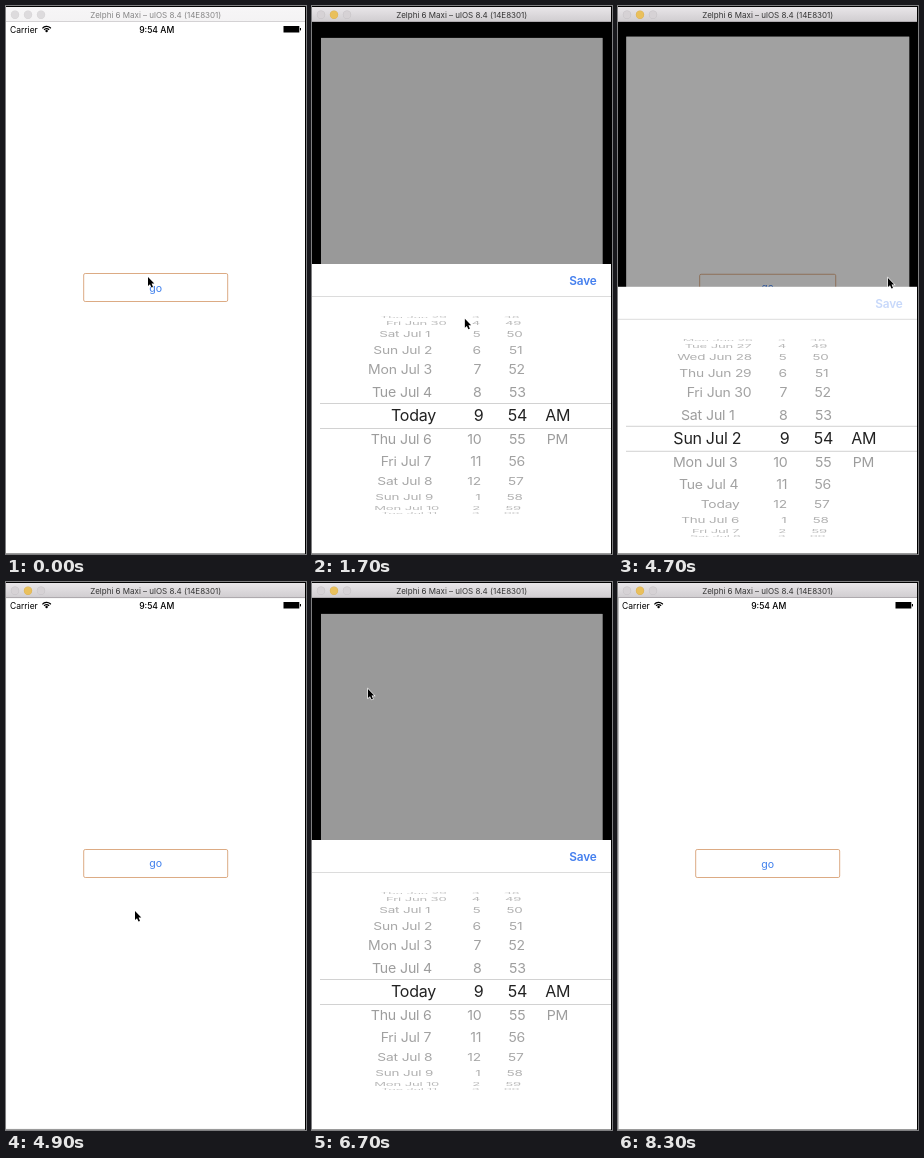
Animation of 300 by 548 pixels, one loop 9 s. Source, as an HTML page with a canvas:

```html
<!DOCTYPE html>
<html lang="en">
<head>
<meta charset="utf-8">
<title>Date picker sheet</title>
<style>
  html, body { margin: 0; width: 100%; height: 100%; overflow: hidden; background: #fff; }
  canvas { display: block; width: 300px; height: 548px; }
</style>
</head>
<body>
<canvas id="stage"></canvas>
<script>
const W = 300, H = 548, LOOP = 9000, STEP = 100;
const FONT = 'Inter, "Liberation Sans", sans-serif';
const canvas = document.getElementById('stage');
const ctx = canvas.getContext('2d');
const dpr = window.devicePixelRatio || 1;
canvas.width = W * dpr;
canvas.height = H * dpr;

// time, x, y of the pointer tip
const POINTER = [
  [0, 142, 271], [400, 142, 271], [600, 161, 277], [700, 161, 277], [800, 164, 277],
  [1500, 164, 277], [2200, 125, 402], [2300, 83, 402], [2400, 83, 402],
  [2500, 85, 403], [2800, 96, 478.4], [2900, 96, 478.4], [3400, 264, 295],
  [3500, 246, 294], [3800, 270, 272], [4700, 270, 272], [4900, 129, 329],
  [5300, 139, 284], [6200, 139, 284], [6600, 49, 125], [6700, 56, 107],
  [8100, 56, 107], [8200, 115, 98]
];
const POINTER_END = 8300;
const PRESSES = [[1000, 1100], [2500, 2900], [4500, 4600], [5700, 5800], [7200, 7300]];
const SHOWS = [[1290, 4657], [5790, 7330]];
const FOCUS = 1000, SAVE_DOWN = 4500, DRAG = 2500, DRAG_TIME = 307, RESET = 5200;

const DAYS = ['Sun', 'Mon', 'Tue', 'Wed', 'Thu', 'Fri', 'Sat'];
const clamp = v => Math.max(0, Math.min(1, v));
const smooth = v => (v = clamp(v), v * v * (3 - 2 * v));
const easeOut = v => 1 - (1 - clamp(v)) ** 3;
const within = (t, spans) => spans.some(([a, b]) => t >= a && t < b);

function pointerAt(t) {
  const i = POINTER.findIndex(k => k[0] > t);
  if (i < 0) return POINTER[POINTER.length - 1].slice(1);
  const [t0, x0, y0] = POINTER[i - 1], [t1, x1, y1] = POINTER[i];
  const u = (t - t0) / (t1 - t0);
  return [x0 + (x1 - x0) * u, y0 + (y1 - y0) * u];
}

function modalAt(t) {
  for (const [a, b] of SHOWS) {
    if (t >= a && t < b) return { sheet: easeOut((t - a) / 182), view: smooth((t - a) / 282) };
    const left = 1 - smooth((t - b) / 250);
    if (t >= b && left > 0) return { sheet: left, view: left };
  }
  return { sheet: 0, view: 0 };
}

const scrollAt = t =>
  t < DRAG || t >= RESET ? 0 : -3 * clamp((t - DRAG) / DRAG_TIME);

function rect(x, y, w, h, fill) {
  ctx.fillStyle = fill;
  ctx.fillRect(x, y, w, h);
}

function disc(x, y, r, fill) {
  ctx.fillStyle = fill;
  ctx.beginPath();
  ctx.arc(x, y, r, 0, 7);
  ctx.fill();
}

function text(s, x, y, size, fill, align = 'left', weight = 400, spacing = 0) {
  ctx.font = `${weight} ${size}px ${FONT}`;
  ctx.letterSpacing = spacing + 'px';
  ctx.textAlign = align;
  ctx.fillStyle = fill;
  ctx.fillText(s, x, y);
}

function titleBar(active) {
  rect(0, 0, W, 1, '#000');
  const g = ctx.createLinearGradient(0, 1, 0, 15);
  g.addColorStop(0, active ? '#e9e6e9' : '#f7f6f7');
  g.addColorStop(1, active ? '#d1ced1' : '#f4f3f4');
  rect(0, 1, 299, 14, g);
  rect(0, 15, 299, 1, active ? '#aeaaae' : '#d4d2d4');
  [9, 22, 35].forEach((x, i) => {
    const mid = active && i === 1;
    disc(x, 8.7, 4.2, mid ? '#d9b05a' : active ? '#c4c0c4' : '#d6d4d6');
    disc(x, 8.7, 3.7, mid ? '#e9c05c' : active ? '#d6d2d5' : '#dddbdd');
  });
  text('Zelphi 6 Maxi – ulOS 8.4 (14E8301)', 149.7, 11.8, 8, active ? '#333' : '#858585', 'center');
}

function statusBar() {
  text('Carrier', 4, 26.6, 8.5, '#000');
  text('9:54 AM', 150.7, 26.6, 8.6, '#000', 'center', 500);
  ctx.strokeStyle = '#000';
  ctx.lineWidth = 1.2;
  for (const r of [3.4, 5.6]) {
    ctx.beginPath();
    ctx.arc(40.6, 26, r, -Math.PI * 0.77, -Math.PI * 0.23);
    ctx.stroke();
  }
  disc(40.6, 25, 1.2, '#000');
  rect(277.5, 20, 15.8, 6.5, '#000');
  rect(293.9, 22, 1.1, 2.4, '#000');
}

function backView(p) {
  const k = 1 - 0.06 * p;
  ctx.save();
  ctx.translate(149.8, 281.5);
  ctx.scale(k, k);
  ctx.translate(-149.8, -281.5);
  rect(0, 16, 299.5, 531, '#fff');
  ctx.strokeStyle = '#dcab84';
  ctx.lineWidth = 1;
  ctx.beginPath();
  ctx.roundRect(77.7, 267.5, 144, 28, 1.5);
  ctx.stroke();
  text('go', 149.6, 285.5, 10.6, '#4080ec', 'center');
  rect(0, 16, 299.5, 531, `rgba(0,0,0,${0.4 * p})`);
  ctx.restore();
}

function dateCell(n, size, ink, spacing, big) {
  if (n === 0) {
    text('Today', big ? 124 : 120.6, 0, size, ink, 'right', 400, spacing);
    return;
  }
  const day = 5 + n;
  const label = day > 0 ? 'Jul ' + day : 'Jun ' + (30 + day);
  text(DAYS[(n + 73) % 7], 83.8, 0, size, ink, 'right', 400, spacing);
  text(label, 87.8, 0, size, ink, 'left', 400, spacing);
}

// Draws the visible rows of one column around a cylinder.
function wheel(cy, scroll, lo, hi, cell) {
  for (let n = Math.max(lo, Math.ceil(scroll - 6.3)); n <= Math.min(hi, scroll + 6.3); n++) {
    const angle = (n - scroll) * 0.243, c = Math.cos(angle);
    const big = Math.abs(n - scroll) < 0.5;
    const size = big ? 16 : 14.2;
    const sx = 1 - 0.12 * (1 - c);
    ctx.save();
    ctx.translate(150, cy + 98.5 * Math.sin(angle));
    ctx.scale(sx, c);
    ctx.translate(-150, size * 0.364);
    ctx.globalAlpha = big ? 1 : 0.55 + 0.45 * c;
    cell(n, size, big ? '#222' : '#9c9c9c', big ? -0.25 : -0.2, big);
    ctx.restore();
  }
}

function sheet(q, scroll, saveDown) {
  const y = 258 + 290 * (1 - q), cy = y + 151.6;
  rect(0, y, 299, H, '#fff');
  ctx.globalAlpha = saveDown ? 0.3 : 1;
  text('Save', 284.7, y + 20.8, 11.8, '#447fee', 'right', 600, -0.1);
  ctx.globalAlpha = 1;
  rect(0, y + 32, 299, 1, '#dcdcdc');
  rect(8, y + 139, 291, 1, '#d2d2d2');
  rect(8, y + 164, 291, 1, '#d2d2d2');

  wheel(cy, scroll, -20, 20, dateCell);
  wheel(cy, 0, -6, 6, (n, size, ink, ls, big) =>
    text((n + 20) % 12 + 1, big ? 171.3 : 169.5, 0, size, ink, 'right', 400, ls));
  wheel(cy, 0, -6, 6, (n, size, ink, ls) =>
    text(String((54 + n) % 60).padStart(2, '0'), 205.5, 0, size, ink, 'center', 400, ls));
  wheel(cy, 0, 0, 1, (n, size, ink, ls) =>
    text(n ? 'PM' : 'AM', 245.7, 0, size, ink, 'center', 400, ls));
}

function pointer(x, y, pressed) {
  if (pressed) {
    ctx.strokeStyle = '#222';
    ctx.lineWidth = 1.3;
    ctx.beginPath();
    ctx.arc(x, y + 0.6, 13.7, 0, 7);
    ctx.stroke();
  }
  ctx.save();
  ctx.translate(x, y);
  const arrow = new Path2D('M0 0V9L2 7.2L3.5 10.6L5 10L3.6 6.6H6.3Z');
  ctx.strokeStyle = '#fff';
  ctx.lineWidth = 1.2;
  ctx.stroke(arrow);
  ctx.fillStyle = '#000';
  ctx.fill(arrow);
  ctx.restore();
}

function draw(t) {
  const active = t >= FOCUS, modal = modalAt(t);
  ctx.setTransform(dpr, 0, 0, dpr, 0, 0);
  rect(0, 0, W, H, '#000');
  backView(modal.view);
  statusBar();
  if (modal.sheet > 0) sheet(modal.sheet, scrollAt(t), t >= SAVE_DOWN && t < RESET);
  else if (active) rect(0, 16, 0.6, 531, '#999');
  rect(0, 547, W, 1, '#9a9a9a');
  rect(299, 0, 1, H, '#000');
  titleBar(active);
  if (t < POINTER_END) pointer(...pointerAt(t), within(t, PRESSES));
}

let last = -1;
function tick() {
  const t = Math.floor(performance.now() % LOOP / STEP) * STEP;
  if (t !== last) draw(last = t);
  requestAnimationFrame(tick);
}
tick();
</script>
</body>
</html>
```
